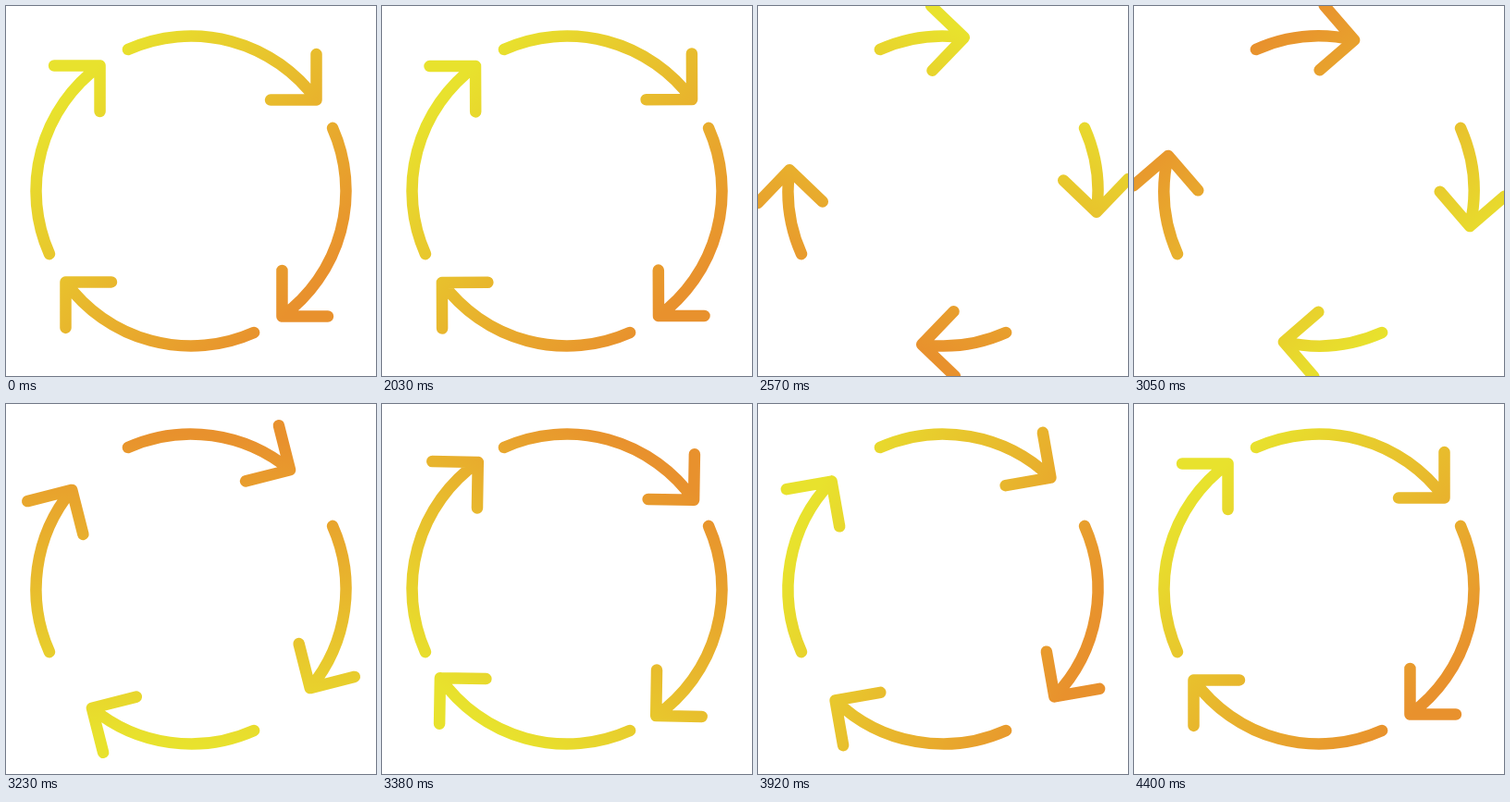
Recreate the animation shown at these times as an HTML page with a canvas. Size 400 by 400 pixels, loop 4430 ms.

```html
<!DOCTYPE html>
<html lang="en">
<head>
<meta charset="utf-8">
<title>Cycle arrows</title>
<style>
  html, body { margin: 0; width: 100%; height: 100%; overflow: hidden; background: #fff; }
  canvas { display: block; width: 400px; height: 400px; }
</style>
</head>
<body>
<canvas id="stage" width="400" height="400"></canvas>
<script>
const ctx = document.getElementById('stage').getContext('2d');
const LOOP = 4430, HOLD = 2000, STEP = 30, STEPS = 80;
const RADIUS = 167.5, ARM = 35, TAIL = -24, TILT = -9;

// [step, angle of the arrow tip in degrees clockwise from the top]
const tipKeys = [[0, 54], [27.5, -5.8], [48, 56.6], [64.5, 44], [STEPS, 54]];

const rad = deg => deg * Math.PI / 180;
const smooth = u => u * u * (3 - 2 * u);

function tipAngle(step) {
  const i = Math.max(1, tipKeys.findIndex(key => step <= key[0]));
  const [s0, a0] = tipKeys[i - 1], [s1, a1] = tipKeys[i];
  return a0 + (a1 - a0) * smooth((step - s0) / (s1 - s0));
}

// cubic-bezier(.3, 0, .5, 1)
function ease(x) {
  let lo = 0, hi = 1;
  for (let i = 0; i < 30; i++) {
    const t = (lo + hi) / 2, r = 1 - t;
    if (0.9 * t * r * r + 1.5 * t * t * r + t * t * t < x) lo = t; else hi = t;
  }
  return smooth(lo);
}

function arrowPath(tip) {
  ctx.moveTo(RADIUS * Math.sin(rad(TAIL)), -RADIUS * Math.cos(rad(TAIL)));
  ctx.arc(0, 0, RADIUS, rad(TAIL - 90), rad(tip - 90), tip < TAIL);
  ctx.save();
  ctx.rotate(rad(tip));
  ctx.translate(0, -RADIUS);
  ctx.rotate(rad(TILT));
  ctx.moveTo(-ARM, -ARM);
  ctx.lineTo(0, 0);
  ctx.lineTo(-ARM, ARM);
  ctx.restore();
}

function draw(time) {
  const step = Math.max(0, Math.floor((time - HOLD) / STEP));
  const tip = tipAngle(step);
  const angle = rad(45 + 360 * ease(step / STEPS));
  const gx = 167 * Math.cos(angle), gy = 167 * Math.sin(angle);

  ctx.setTransform(1, 0, 0, 1, 200, 200);
  ctx.clearRect(-200, -200, 400, 400);
  const gradient = ctx.createLinearGradient(-gx, -gy, gx, gy);
  gradient.addColorStop(0, '#e8e22d');
  gradient.addColorStop(1, '#e8912d');

  ctx.beginPath();
  for (let i = 0; i < 4; i++) {
    arrowPath(tip);
    ctx.rotate(Math.PI / 2);
  }
  // The gradient stays in stage space, independent of the arrows' rotation
  ctx.setTransform(1, 0, 0, 1, 200, 200);
  ctx.strokeStyle = gradient;
  ctx.lineWidth = 12.5;
  ctx.lineCap = ctx.lineJoin = 'round';
  ctx.stroke();
}

function tick() {
  draw(performance.now() % LOOP);
  requestAnimationFrame(tick);
}
tick();
</script>
</body>
</html>
```
